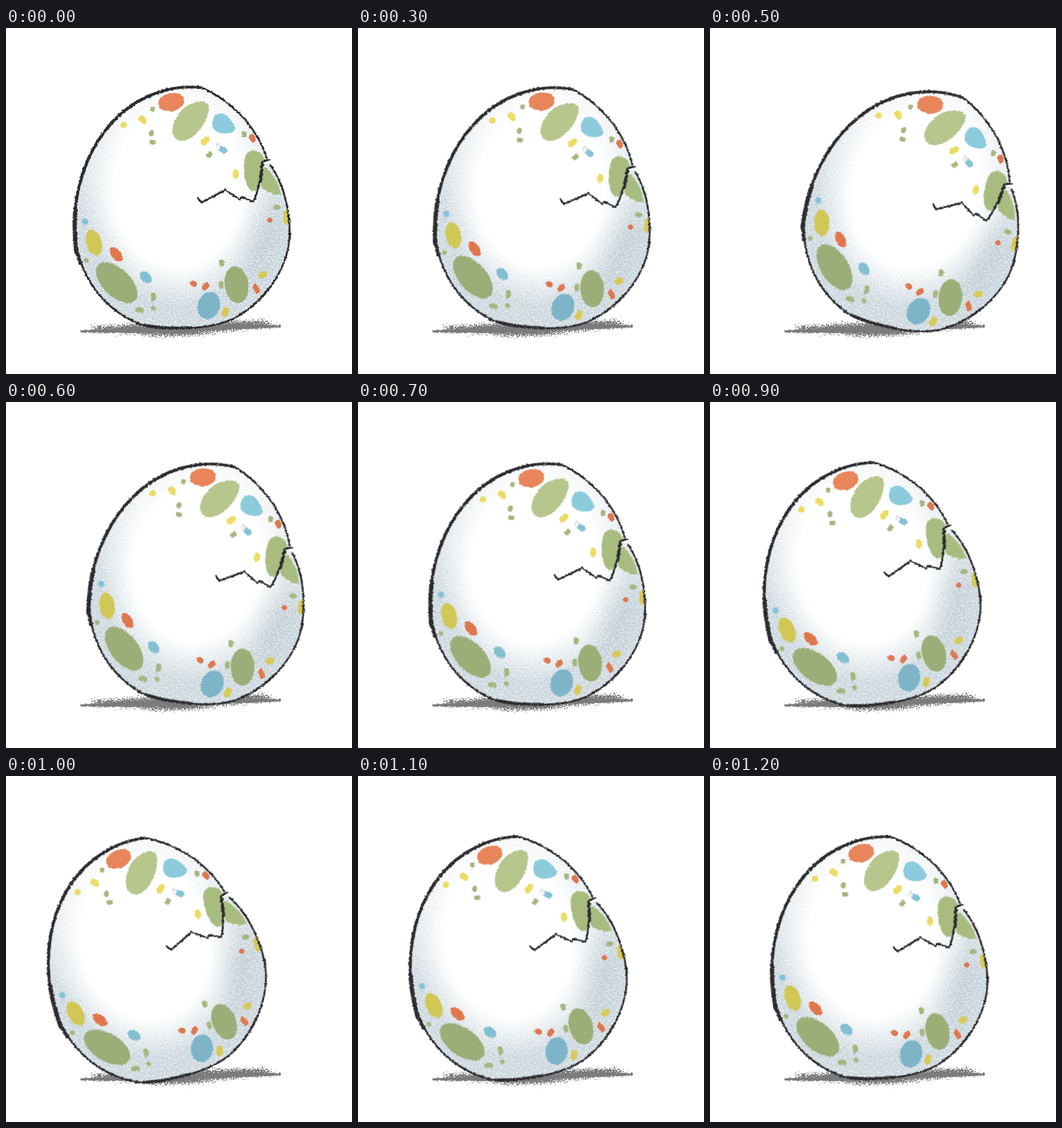
An HTML page for the animation above (1.3 s loop, 500 px wide and 500 px high).

```html
<!DOCTYPE html>
<html lang="en">
<head>
<meta charset="utf-8">
<title>Rocking egg</title>
<style>
html, body { margin: 0; width: 100%; height: 100%; overflow: hidden; background: #fff; }
svg { display: block; width: 100%; height: 100%; }
.line { fill: none; stroke: #2c2c2f; }
.line, .flecks { stroke-linecap: round; stroke-linejoin: round; }
</style>
</head>
<body>
<svg viewBox="0 0 500 500">
  <defs>
    <filter id="rough" filterUnits="userSpaceOnUse" x="0" y="0" width="500" height="500" color-interpolation-filters="sRGB">
      <feTurbulence type="fractalNoise" baseFrequency=".35" numOctaves="2" seed="4"/>
      <feDisplacementMap in="SourceGraphic" scale="3.5" xChannelSelector="R" yChannelSelector="G"/>
      <feGaussianBlur stdDeviation=".5"/>
    </filter>
    <filter id="spray" filterUnits="userSpaceOnUse" x="0" y="380" width="500" height="120" color-interpolation-filters="sRGB">
      <feTurbulence type="fractalNoise" baseFrequency=".6" numOctaves="2" seed="9"/>
      <feDisplacementMap in="SourceGraphic" scale="20" xChannelSelector="R" yChannelSelector="G"/>
      <feGaussianBlur stdDeviation=".4"/>
    </filter>
    <filter id="grain" filterUnits="userSpaceOnUse" x="0" y="0" width="500" height="500" color-interpolation-filters="sRGB">
      <feTurbulence type="fractalNoise" baseFrequency=".4" numOctaves="2" seed="7"/>
      <feColorMatrix values="0 0 0 0 0  0 0 0 0 0  0 0 0 0 0  1.6 0 0 0 0" result="noise"/>
      <feComposite in="SourceGraphic" in2="noise" operator="in"/>
    </filter>
    <filter id="soft" x="-100%" y="-50%" width="300%" height="200%"><feGaussianBlur stdDeviation="14"/></filter>
    <radialGradient id="shade" gradientUnits="userSpaceOnUse" cx="0" cy="0" r="170">
      <stop offset=".54" stop-color="#c8d4db" stop-opacity="0"/>
      <stop offset=".64" stop-color="#c8d4db" stop-opacity=".35"/>
      <stop offset=".82" stop-color="#c8d4db"/>
    </radialGradient>
    <linearGradient id="light" gradientUnits="userSpaceOnUse" x1="0" y1="85" x2="0" y2="290">
      <stop offset="0" stop-color="#fff" stop-opacity=".7"/>
      <stop offset="1" stop-color="#fff" stop-opacity="0"/>
    </linearGradient>
    <path id="shell" d="M383 198C404 228 411 265 411 300C408 350 375 395 330 420C300 434 255 435 228 434C172 433 101 378 100 285C100 200 145 111 235 89C255 84 280 83 292 90C335 112 365 148 378 188"/>
    <clipPath id="inside"><use href="#shell"/></clipPath>
  </defs>

  <g fill="#7b7b7b">
    <path filter="url(#spray)" d="M124 432L190 428L372 423L388 430L330 436L300 439C270 446 220 447 190 441L130 437Z"/>
    <path filter="url(#rough)" d="M107 437L180 433L397 429L398 433L190 441L108 440Z"/>
  </g>

  <g id="egg">
    <use href="#shell" fill="#fff"/>
    <g clip-path="url(#inside)">
      <g filter="url(#grain)">
        <rect x="-170" y="-170" width="340" height="340" fill="url(#shade)" transform="translate(249 232) scale(1 1.22)"/>
        <ellipse cx="374" cy="310" rx="18" ry="60" fill="#a9bac7" opacity=".4" filter="url(#soft)" transform="rotate(14 374 310)"/>
      </g>
      <rect x="90" y="80" width="330" height="220" fill="url(#light)"/>
      <g filter="url(#rough)">
        <!-- large spots -->
        <ellipse cx="240" cy="107" rx="19" ry="13" fill="#e8855a" transform="rotate(-12 240 107)"/>
        <path fill="#b7c68d" d="M270 109C284 103 297 106 294 120C291 134 278 160 257 163C240 164 238 146 246 132C253 119 260 112 270 109Z"/>
        <path fill="#8bcbdc" d="M306 125C313 121 322 126 328 136C335 146 332 152 322 152C310 154 300 148 299 139C299 132 302 127 306 125Z"/>
        <path fill="#a9bc80" d="M350 180C358 174 372 177 374 190C371 215 367 232 361 236C350 236 345 220 345 205C345 193 346 184 350 180ZM374 200C385 208 396 225 398 240C388 243 374 235 369 228Z"/>
        <ellipse cx="128" cy="310" rx="11" ry="19" fill="#d0c755" transform="rotate(-15 128 310)"/>
        <ellipse cx="160" cy="327" rx="7" ry="12" fill="#e0764c" transform="rotate(-40 160 327)"/>
        <ellipse cx="161" cy="368" rx="20" ry="37" fill="#9bae78" transform="rotate(-46 161 368)"/>
        <ellipse cx="203" cy="360" rx="10" ry="7" fill="#82bfd1" transform="rotate(45 203 360)"/>
        <ellipse cx="294" cy="401" rx="16" ry="20" fill="#7db4c8" transform="rotate(20 294 401)"/>
        <ellipse cx="334" cy="371" rx="17" ry="27" fill="#9bae78" transform="rotate(-8 334 371)"/>
        <!-- flecks: short dabs of a round brush -->
        <g class="flecks" stroke-width="9">
          <path stroke="#ebdc63" d="M197 131l3 3M171 140h0M287 165l4-4M333 209v4"/>
          <path stroke="#d6ca55" d="M406 268v11M319 408l-2 5M370 358l4-2"/>
          <path stroke="#82c3d6" d="M313 175l3 2M115 280h0"/>
          <path stroke="#dd7850" stroke-width="8" d="M356 157l2 4M382 278h0M271 369l2 1M288 375l3-3M361 374l3 6"/>
          <path stroke="#a5b67e" stroke-width="7" d="M213 117h0M211 151v2M212 165h2M294 184l2-2M345 153v2M391 259h3M117 336h0M214 386v5M214 405h0M191 407l6 1M313 338v3M312 369v4"/>
        </g>
        <ellipse cx="308" cy="171" rx="2.5" ry="3.5" fill="#fff" stroke="#c5c7d8" transform="rotate(-30 308 171)"/>
      </g>
    </g>
    <g class="line" filter="url(#rough)">
      <use href="#shell" stroke-width="2.8"/>
      <path stroke-width="4.4" d="M108 340C102 322 100 305 100 285C100 200 145 111 235 89"/>
      <path stroke-width="6" d="M103 325Q99 300 101 262"/>
      <path stroke-width="3.8" d="M190 427Q225 435 268 433M235 89Q255 84 280 86"/>
      <path stroke="#fff" stroke-width="3.5" d="M377 194L384 193"/>
      <path stroke-width="2.6" d="M278 246L284 252L318 234L339 248L341 244L358 251C365 240 369 215 371 193L382 190"/>
      <path stroke-width="3.6" d="M372 195L369 222"/>
    </g>
  </g>
</svg>
<script>
const STEP = 100, SLOTS = 13;
// Key poses: slot, lean in degrees, sink in pixels; the egg moves evenly between them
const keys = [[0, 0, 0], [2, 0, 0], [5, 13.7, -1], [7, 2, 3.6], [9, -7.4, 1.4], [10, -13.3, -.7], [12, -3.5, 2.5], [SLOTS, 0, 0]];
const egg = document.getElementById('egg');
let shown = -1;

function poseAt(slot) {
  const next = keys.findIndex(key => key[0] > slot);
  const [from, to] = [keys[next - 1], keys[next]];
  const part = (slot - from[0]) / (to[0] - from[0]);
  return from.map((value, i) => value + (to[i] - value) * part);
}

function draw(now) {
  const slot = Math.floor(now / STEP) % SLOTS;
  if (slot !== shown) {
    const [, lean, sink] = poseAt(shown = slot);
    egg.setAttribute('transform', `translate(-1 ${sink}) rotate(${lean} 260 440)`);
  }
  requestAnimationFrame(draw);
}
draw(performance.now());
</script>
</body>
</html>
```
